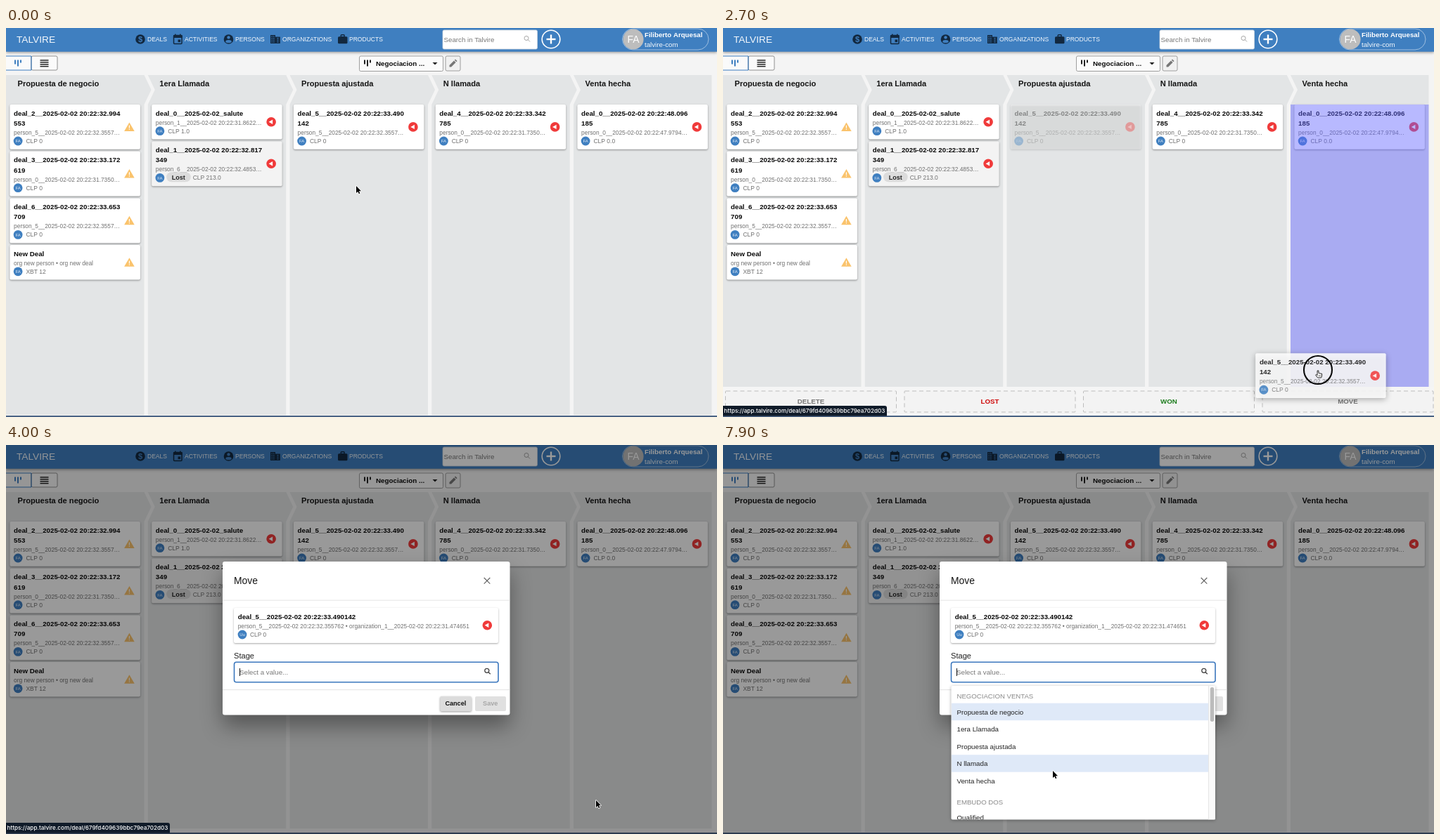
An HTML page with a canvas that plays this animation: 1011 by 554 pixels, repeating every 8 s.

```html
<!DOCTYPE html>
<html lang="es">
<head>
<meta charset="utf-8">
<title>Deals board</title>
<style>
  html, body { margin: 0; width: 100%; height: 100%; overflow: hidden; background: #f4f4f4; }
  canvas { display: block; width: 1011px; height: 554px; }
</style>
</head>
<body>
<canvas id="stage"></canvas>
<script>
const W = 1011, H = 554, LOOP = 8000, STEP = 100;
const SANS = '"Liberation Sans", Arial, sans-serif';
const BLUE = '#3f7fc0', RED = '#f03a3a', INK = '#0b0b0b', GREY = '#717171';
const canvas = document.getElementById('stage');
const c = canvas.getContext('2d');
const dpr = window.devicePixelRatio || 1;
canvas.width = W * dpr;
canvas.height = H * dpr;

const COL_W = 196.5, COL_GAP = 201.75;
const GRAB = { x: 88.5, y: 23.5 };
const deal = (title, person, value, icon, lost) => ({ title, person, value, icon, lost });
const columns = [
  { name: 'Propuesta de negocio', deals: [
    deal(['deal_2__2025-02-02 20:22:32.994', '553'], 'person_5__2025-02-02 20:22:32.3557…', 'CLP 0', 'warn'),
    deal(['deal_3__2025-02-02 20:22:33.172', '619'], 'person_0__2025-02-02 20:22:31.7350…', 'CLP 0', 'warn'),
    deal(['deal_6__2025-02-02 20:22:33.653', '709'], 'person_5__2025-02-02 20:22:32.3557…', 'CLP 0', 'warn'),
    deal(['New Deal'], 'org new person • org new deal', 'XBT 12', 'warn')] },
  { name: '1era Llamada', deals: [
    deal(['deal_0__2025-02-02_salute'], 'person_1__2025-02-02 20:22:31.8622…', 'CLP 1.0', 'late'),
    deal(['deal_1__2025-02-02 20:22:32.817', '349'], 'person_6__2025-02-02 20:22:32.4853…', 'CLP 213.0', 'late', true)] },
  { name: 'Propuesta ajustada', deals: [
    deal(['deal_5__2025-02-02 20:22:33.490', '142'], 'person_5__2025-02-02 20:22:32.3557…', 'CLP 0', 'late')] },
  { name: 'N llamada', deals: [
    deal(['deal_4__2025-02-02 20:22:33.342', '785'], 'person_0__2025-02-02 20:22:31.7350…', 'CLP 0', 'late')] },
  { name: 'Venta hecha', deals: [
    deal(['deal_0__2025-02-02 20:22:48.096', '185'], 'person_0__2025-02-02 20:22:47.9794…', 'CLP 0.0', 'late')] }
];
const dragged = columns[2].deals[0];

// Easing and timing
const clamp = u => Math.max(0, Math.min(1, u));
const ease = {
  both: u => u * u * (3 - 2 * u),
  in: u => u * u,
  out: u => u * (2 - u)
};
const ramp = (t, from, to) => ease.both(clamp((t - from) / (to - from)));

// time, x, y, easing towards this point
const path = [
  [0, 498, 225], [600, 498, 225], [1200, 500, 178, 'both'], [1300, 500, 178],
  [1700, 498, 133, 'both'], [2100, 560, 255, 'in'], [2700, 846, 487, 'out'],
  [3100, 862, 508, 'both'], [3300, 862, 514, 'out'], [3600, 858, 513, 'both'],
  [3700, 858, 513], [4000, 839, 506, 'both'], [4100, 839, 506],
  [4600, 518, 330, 'both'], [4800, 515, 328, 'out'], [5600, 515, 328],
  [5900, 482, 436, 'both'], [7600, 482, 436], [7900, 469, 464, 'both'], [8000, 469, 464]
];
function pointer(t) {
  const i = Math.max(1, path.findIndex(k => k[0] >= t));
  const [t0, x0, y0] = path[i - 1], [t1, x1, y1, e] = path[i];
  const u = ease[e || 'both'](clamp((t - t0) / (t1 - t0)));
  return { x: x0 + (x1 - x0) * u, y: y0 + (y1 - y0) * u };
}

// Drawing helpers
function text(s, x, y, size, color = INK, weight = 400, align = 'left', family = SANS) {
  c.font = `${weight} ${size}px ${family}`;
  c.fillStyle = color;
  c.textAlign = align;
  c.fillText(s, x, y);
}
function rect(x, y, w, h, color) {
  c.fillStyle = color;
  c.fillRect(x, y, w, h);
}
function box(x, y, w, h, r, fill, stroke, lw = 1) {
  c.beginPath();
  c.roundRect(x, y, w, h, r);
  if (fill) { c.fillStyle = fill; c.fill(); }
  if (stroke) { c.strokeStyle = stroke; c.lineWidth = lw; c.stroke(); }
}
function raised(x, y, w, h, r, fill, dy = 1, blur = 2.5, alpha = 0.4) {
  c.save();
  c.shadowColor = `rgba(0,0,0,${alpha})`;
  c.shadowBlur = blur * dpr;
  c.shadowOffsetY = dy * dpr;
  box(x, y, w, h, r, fill);
  c.restore();
}
function disc(x, y, r, fill, stroke, lw = 1) {
  c.beginPath();
  c.arc(x, y, r, 0, 7);
  if (fill) { c.fillStyle = fill; c.fill(); }
  if (stroke) { c.strokeStyle = stroke; c.lineWidth = lw; c.stroke(); }
}
function poly(points, fill) {
  c.beginPath();
  points.forEach(([x, y]) => c.lineTo(x, y));
  c.closePath();
  if (fill) { c.fillStyle = fill; c.fill(); }
}
function line(x1, y1, x2, y2, color, lw = 1) {
  c.beginPath();
  c.moveTo(x1, y1);
  c.lineTo(x2, y2);
  c.strokeStyle = color;
  c.lineWidth = lw;
  c.stroke();
}
function lens(x, y, color, lw) {
  disc(x - 1, y - 1, 3, null, color, lw);
  line(x + 1.2, y + 1.2, x + 4, y + 4, color, lw);
}
function bars(x, y, color) {
  [6, 9, 4].forEach((h, i) => rect(x - 5 + i * 4, y - 4.5, 2, h, color));
}
function late(x, y) {
  disc(x, y, 6.8, RED);
  poly([[x - 3.6, y], [x + 2, y - 3.2], [x + 2, y + 3.2]], '#fff');
}
function warn(x, y) {
  poly([[x, y - 6.5], [x + 7.3, y + 6], [x - 7.3, y + 6]], '#fac36c');
  rect(x - 0.6, y - 2.3, 1.2, 4, '#fff');
  rect(x - 0.6, y + 2.7, 1.2, 1.3, '#fff');
}
function badge(x, y, s) {
  disc(x, y, 6.4, BLUE);
  text(s, x, y + 2.2, 6, '#e6eef7', 400, 'center');
}

// Board
const cardHeight = d => d.title.length > 1 ? 63.8 : 49.5;

function card(d, x, y, lift) {
  const h = cardHeight(d), end = y + h;
  if (lift) raised(x, y, 185.5, h, 2, '#fff', 2, 9, 0.35);
  else raised(x, y, 185.5, h, 2, d.lost ? '#f3f3f3' : '#fff');
  d.title.forEach((s, i) => text(s, x + 5.7, y + 15.6 + i * 14.3, 9.72, INK, 700));
  text(d.person, x + 5.7, end - 21, 8.36, GREY);
  badge(x + 11.7, end - 11.8, 'FA');
  if (d.lost) {
    box(x + 21, end - 20, 34.5, 14, 7, '#dcdcdc');
    text('Lost', x + 38, end - 9.6, 9, '#222', 700, 'center');
  }
  text(d.value, x + (d.lost ? 58.5 : 23), end - 8.8, 8.5, GREY);
  (d.icon === 'warn' ? warn : late)(x + 170, y + h / 2);
}

function navIcons() {
  const dark = '#12283f';
  disc(191, 16, 6.8, dark);
  text('$', 191, 19.8, 11, BLUE, 700, 'center');
  box(238.5, 10.5, 11.5, 12, 1, null, dark, 1.5);
  rect(238, 10, 12.5, 4, dark);
  rect(240, 8.6, 1.6, 2, dark);
  rect(247, 8.6, 1.6, 2, dark);
  rect(244.5, 16.5, 3.6, 3.6, dark);
  disc(316.5, 16, 6.8, dark);
  disc(316.5, 13.4, 2.2, BLUE);
  c.beginPath();
  c.ellipse(316.5, 19.2, 4.2, 2.1, 0, 0, 7);
  c.fill();
  rect(376, 10, 7, 12, dark);
  rect(383, 12.6, 6.8, 9.4, dark);
  for (let i = 0; i < 4; i++) {
    rect(377.4, 11.4 + i * 2.6, 1.4, 1.3, BLUE);
    rect(380.1, 11.4 + i * 2.6, 1.4, 1.3, BLUE);
    if (i) rect(385.6, 11.4 + i * 2.6, 1.8, 1.3, BLUE);
  }
  box(472, 12.2, 13.5, 10, 1.5, dark);
  box(476.2, 9.8, 5, 3, 1, null, dark, 1.4);
}

function header() {
  raised(0, -4, W, 37.7, 0, BLUE, 1.5, 4, 0.4);
  text('TALVIRE', 15, 20.8, 13.7, '#f4f8fc');
  navIcons();
  const links = { DEALS: 201, ACTIVITIES: 254, PERSONS: 326, ORGANIZATIONS: 393, PRODUCTS: 488 };
  for (const name in links) text(name, links[name], 19, 8.55, '#f4f8fc');
  box(621, 3, 134.5, 27, 2, '#fff', '#cfd6de', 0.8);
  text('Search in Talvire', 622.5, 20, 9.72, '#777');
  lens(741, 15.5, '#a5a5a5', 1);
  disc(775, 16, 12.8, null, '#fff', 1.6);
  rect(768.5, 14.8, 13, 2.4, '#fff');
  rect(773.8, 9.5, 2.4, 13, '#fff');
  box(876.5, 1, 122.5, 30, 15, null, '#a9c6e4', 0.9);
  disc(892, 16, 14.6, '#bdbdbd');
  text('FA', 892, 20.9, 13.9, '#fff', 400, 'center');
  text('Filiberto Arquesal', 908, 13.2, 9.7, '#fff', 700);
  text('talvire-com', 908, 27, 9.72, '#f4f8fc');
}

function toolbar() {
  box(-2, 40, 38, 20, 0, '#fafafa', BLUE, 1);
  box(36, 40, 37, 20, 2, '#fafafa', '#777', 0.8);
  line(36, 40, 36, 60, BLUE);
  bars(17, 50, BLUE);
  for (let i = 0; i < 4; i++) rect(48.5, 45.2 + i * 2.9, 12, 1.5, '#222');
  box(502.5, 40, 119, 21.5, 2, '#fbfbfb', '#888', 0.8);
  bars(514, 50, '#222');
  text('Negociacion ...', 526, 54, 9.8, INK, 700);
  poly([[606.5, 49], [613.5, 49], [610, 52.6]], '#222');
  box(625, 40, 21, 21, 2, '#f1f1f1', '#8a8a8a', 0.8);
  poly([[630.5, 55.6], [630.5, 53], [637, 46.5], [639.6, 49.1], [633.1, 55.6]], '#777');
  poly([[637.8, 45.7], [639, 44.6], [641.5, 47.1], [640.4, 48.3]], '#777');
}

function columnShape(i, bottom) {
  const x = i * COL_GAP, r = x + COL_W;
  const left = i ? [[x, 109], [x + 10, 88], [x, 67]] : [[x, 67]];
  const right = i < 4 ? [[r, 67], [r + 10, 88], [r, 109]] : [[r, 67]];
  poly([[x, bottom], ...left, ...right, [r, bottom]], '#e3e5e6');
}

function board(t, p, bottom, dragging) {
  const target = dragging && p.y < 511 ? Math.floor(p.x / COL_GAP) : -1;
  columns.forEach((col, i) => {
    const x = i * COL_GAP;
    columnShape(i, bottom);
    text(col.name, x + 16.5, 83, 11.1, '#141414', 700);
    let y = 109;
    for (const d of col.deals) {
      c.globalAlpha = dragging && d === dragged ? 0.4 : 1;
      card(d, x + 5.4, y);
      c.globalAlpha = 1;
      y += cardHeight(d) + 2.9;
    }
    if (i === target) rect(x, 109, COL_W, bottom - 109, 'rgba(98,100,255,0.45)');
  });
  if (t >= 700 && t < 3000 && p.x < 3 * COL_GAP) {
    c.globalAlpha = ramp(t, 600, 900);
    raised(404.8, bottom - 20, 188.5, 18.5, 2, '#cfcfd2', 0.5, 2);
    text('+', 499, bottom - 6.2, 14, '#555', 400, 'center');
    c.globalAlpha = 1;
  }
}

function footer(top, hover) {
  if (top > 551) return;
  rect(0, top, W, H - top, '#f5f5f5');
  const zones = [['DELETE', '#777'], ['LOST', '#cf0a0a'], ['WON', '#1c7c1c'], ['MOVE', '#777']];
  zones.forEach(([name, color], i) => {
    const x = 3.5 + i * 254.5;
    c.setLineDash([6, 4]);
    box(x, top + 6, 243, 30, 1, hover && i === 3 ? '#e9e9e9' : '#f3f3f3', '#bdbdbd', 1);
    c.setLineDash([]);
    text(name, x + 121.5, top + 24, 9.72, color, 700, 'center');
  });
}

// Dialog
function dialog(t) {
  raised(308, 166, 408.5, 218.5, 3, '#fff', 16, 30, 0.38);
  text('Move', 324, 198, 13.9, '#161616');
  line(679.7, 189, 688.3, 197.6, '#666', 1.2);
  line(688.3, 189, 679.7, 197.6, '#666', 1.2);
  rect(308, 220.7, 408.5, 0.8, '#dcdcdc');
  rect(308, 348.3, 408.5, 0.8, '#dcdcdc');

  raised(324, 232, 376, 50, 2, '#fff', 1, 2.5, 0.35);
  text('deal_5__2025-02-02 20:22:33.490142', 329.7, 248, 9.72, INK, 700);
  text('person_5__2025-02-02 20:22:32.355762 • organization_1__2025-02-02 20:22:31.474651',
    329.7, 260.8, 8.3, GREY);
  badge(336, 270, 'Uu');
  text('CLP 0', 347, 273, 8.4, GREY);
  late(684.3, 256.7);

  text('Stage', 324, 304.3, 11.1, '#222');
  box(324.5, 309.3, 375.5, 28.4, 3, '#fff', '#3b77bd', 1.6);
  text('Select a value...', 332, 327, 9.72, '#787878');
  lens(684.8, 322.3, '#444', 1.3);
  if (t >= 3900 && Math.floor((t - 3900) / 500) % 2 === 0) rect(332, 318, 1, 11, '#111');

  raised(617.3, 358, 44.5, 21, 2, '#dcdcdc', 1, 3);
  text('Cancel', 639.3, 371.3, 9.1, '#111', 700, 'center');
  box(667, 358, 44, 21, 2, '#e0e0e0');
  text('Save', 688.7, 371.3, 9.1, '#a6a6a6', 700, 'center');
}

function menu(t, p) {
  const open = ramp(t, 4600, 5000);
  if (!open) return;
  const row = 24.5, top = 367.7;
  c.save();
  c.globalAlpha = open;
  c.translate(0, 343);
  c.scale(1, 0.8 + 0.2 * open);
  c.translate(0, -343);
  raised(324.5, 343, 375.5, 190.5, 2, '#fff', 1, 4, 0.35);
  c.beginPath();
  c.rect(324.5, 343, 375.5, 190.5);
  c.clip();
  text('NEGOCIACION VENTAS', 332.5, 361.3, 9.62, '#8a8a8a');
  const hover = Math.floor((p.y - top) / row);
  columns.forEach((col, i) => {
    const y = top + i * row;
    if (i === 0 || i === hover) rect(325, y, 365, row, '#dfe9f8');
    text(col.name, 332.5, y + 15.8, 9.74, '#222');
  });
  text('EMBUDO DOS', 332.5, 512, 9.62, '#8a8a8a');
  text('Qualified', 332.5, 533.8, 9.74, '#222');
  rect(690, 343, 10, 190.5, '#fafafa');
  rect(690, 343, 0.8, 190.5, '#e2e2e2');
  box(692.8, 345, 5.4, 49, 2.7, '#bcbcbc');
  c.restore();
}

// Pointer and browser status
function status(t) {
  const alpha = t < 4000 ? [0, 0.25, 0.65, 1][Math.max(0, Math.min(3, (t - 2000) / 100))]
    : 1 - ramp(t, 4150, 4450);
  if (!alpha) return;
  c.globalAlpha = alpha;
  box(0, 538, 233, 14.5, [0, 3, 0, 0], '#101b29');
  text('https://app.talvire.com/deal/679fd409639bbc79ea702d03', 1.5, 548.4, 8.15, '#fff', 500, 'left',
    'Inter, "Liberation Sans", sans-serif');
  c.globalAlpha = 1;
}

function arrow(x, y) {
  const shape = [[0, 0], [0, 10], [2.4, 7.9], [3.9, 11.2], [5.4, 10.5], [3.9, 7.3], [7, 7.2]];
  poly(shape.map(([a, b]) => [x + a, y + b]));
  c.lineJoin = 'round';
  c.strokeStyle = '#fff';
  c.lineWidth = 1.6;
  c.stroke();
  c.fillStyle = '#000';
  c.fill();
}

function hand(x, y) {
  const shape = [[-0.9, 1], [0.9, 1], [1, 4.6], [5.6, 5.4], [5.6, 8.6], [4.6, 11], [-0.4, 11],
    [-3.4, 7.4], [-2.6, 6.4], [-0.9, 7.6]];
  poly(shape.map(([a, b]) => [x + a, y + b]), '#fff');
  c.lineJoin = 'round';
  c.strokeStyle = '#111';
  c.lineWidth = 0.9;
  c.stroke();
  for (const dx of [1.1, 2.6, 4]) line(x + dx, y + 7.2, x + dx, y + 9.4, '#111', 0.5);
}

function draw(t) {
  const p = pointer(t);
  const dragging = t >= 1700 && t < 3800;
  const raise = t < 3800 ? ramp(t, 2000, 2300) : 1 - ramp(t, 3800, 4060);
  const top = 552 - 41 * raise;

  c.setTransform(dpr, 0, 0, dpr, 0, 0);
  rect(0, 0, W, H, '#f4f4f4');
  toolbar();
  header();
  board(t, p, Math.min(551.3, top), dragging);
  footer(top, dragging && p.y >= 511);
  rect(0, 552, W, 2, '#4a6384');

  if (dragging) {
    const lag = pointer(t - 20);
    c.globalAlpha = 0.86;
    card(dragged, lag.x - GRAB.x, lag.y - GRAB.y, true);
    c.globalAlpha = 1;
  }
  const shade = t < 3800 ? 0 : ramp(t, 3700, 4000);
  if (shade) {
    rect(0, 0, W, H, `rgba(0,0,0,${0.4 * shade})`);
    c.globalAlpha = shade;
    dialog(t);
    c.globalAlpha = 1;
    menu(t, p);
  }
  status(t);

  if (t >= 1900 && t < 3800) disc(p.x, p.y, Math.min(20, 14 + (t - 2100) / 25), null, '#0a0a0a', 2.1);
  const onCard = t >= 1500 && t < 1800;
  const carrying = t >= 2300 && t < 3800;
  (onCard || carrying ? hand : arrow)(p.x, p.y);
}

const start = performance.now();
function tick() {
  const t = (performance.now() - start) % LOOP;
  draw(Math.floor(t / STEP) * STEP);
  requestAnimationFrame(tick);
}
tick();
</script>
</body>
</html>
```
